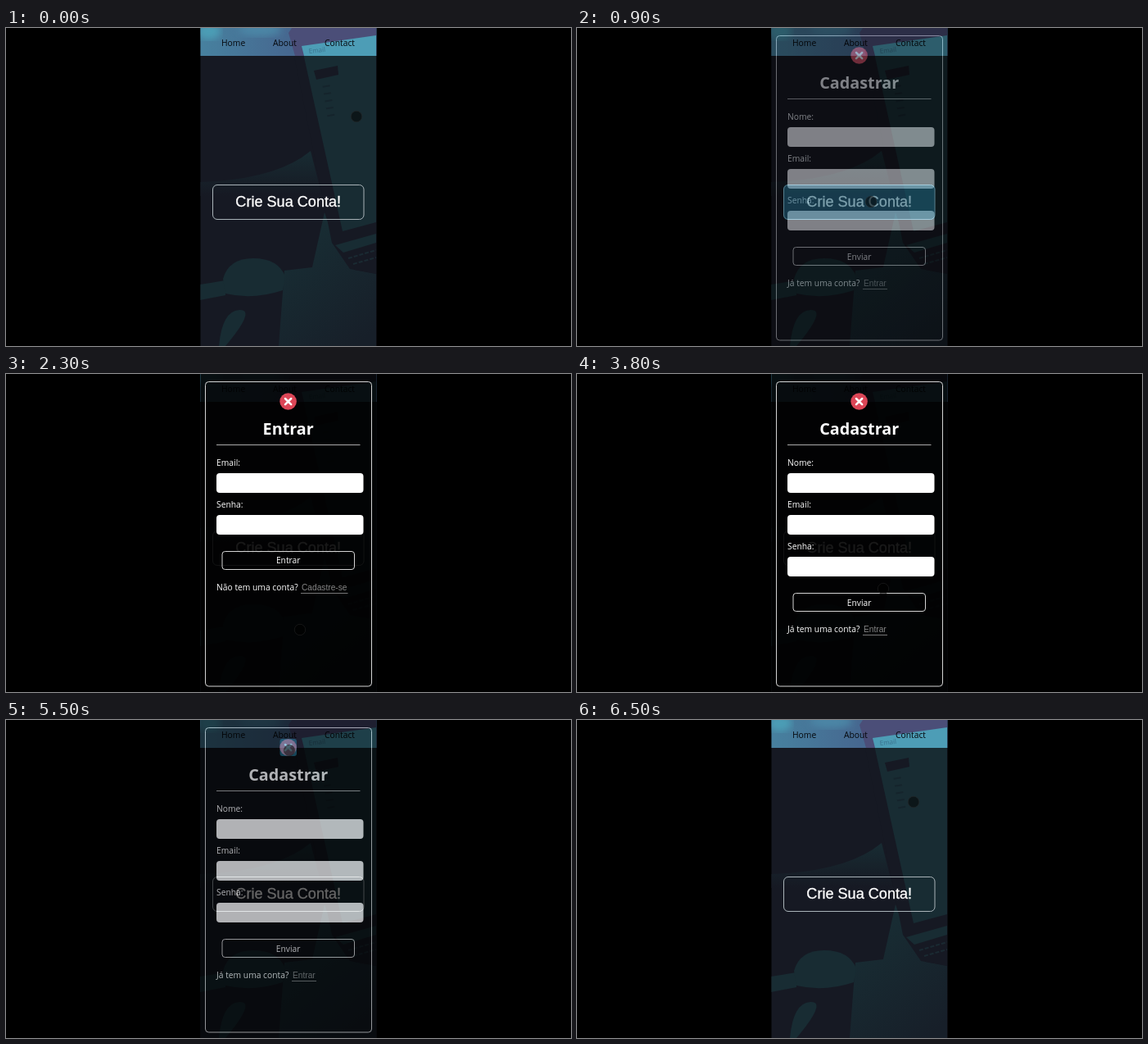
These frames come from a looping animation (690x388 px, 7100 ms). An HTML page:

```html
<!DOCTYPE html>
<html lang="pt">
<head>
<meta charset="utf-8">
<title>Crie Sua Conta</title>
<style>
html, body { margin: 0; width: 100%; height: 100%; overflow: hidden; background: #000; }
svg { display: block; width: 690px; height: 388px; }
text { font: 10.3px "Open Sans", "Noto Sans", sans-serif; fill: #fff; }
.mid { text-anchor: middle; }
.nav text { fill: #05080c; }
.title { font-size: 19.8px; font-weight: 700; }
.cta { font: 18.1px "Liberation Sans", Arial, sans-serif; stroke: #fff; stroke-width: .3px; }
.link { font: 10.2px "Liberation Sans", Arial, sans-serif; fill: #858585; }
.line { fill: none; stroke: #d4d4d4; }
.button { fill: none; stroke: #a9b3b8; }
.dark { fill: #161923; }
.teal { fill: #182c33; }
.tap { fill: #33b5e5; }
</style>
</head>
<body>
<svg viewBox="0 0 690 388">
  <defs>
    <clipPath id="phone"><rect x="237.5" width="215" height="388"/></clipPath>
    <linearGradient id="sky">
      <stop stop-color="#47819f"/><stop offset=".5" stop-color="#466890"/>
    </linearGradient>
    <linearGradient id="desk" x1=".3" y1=".2" x2=".8" y2="1">
      <stop stop-color="#182c33"/><stop offset="1" stop-color="#171f29"/>
    </linearGradient>
    <linearGradient id="sleeve" x2="0" y2="1">
      <stop stop-color="#182c33"/><stop offset="1" stop-color="#161923"/>
    </linearGradient>
    <filter id="soft"><feGaussianBlur stdDeviation="4"/></filter>
  </defs>
  <g clip-path="url(#phone)">
    <rect class="dark" x="237" width="216" height="388"/>
    <!-- sleeve, desk and cup -->
    <path d="M237 188Q330 185 372 150L386 205H237Z" fill="url(#sleeve)"/>
    <path class="teal" d="M237 313L268 308V326L237 332Z"/>
    <path d="M389 225L404 268L425 295L452 300V388H333L340 296L374 292Z" fill="url(#desk)"/>
    <path class="teal" d="M265 306Q272 281 302 281T341 303L338 320Q302 332 268 324Z"/>
    <path class="teal" d="M260 388Q264 345 285 344T268 388Z"/>
    <!-- laptop -->
    <path class="dark" d="M345 0H452V300L420 294L398 262Z"/>
    <path class="teal" d="M361 22L452 9V237L411 248Z"/>
    <path class="teal" d="M402 265L452 251V262L412 274Z"/>
    <path d="M418 281L452 271M424 288L452 280" stroke="#1a2a32" stroke-width="2" stroke-dasharray="5 2"/>
    <path class="dark" d="M376 52L405 46L406 57L379 63Z"/>
    <path d="M391 70L397 108" stroke="#15242c" stroke-width="9" stroke-dasharray="2 7"/>
    <g class="nav">
      <rect x="237" width="216" height="34" fill="url(#sky)"/>
      <ellipse cx="248" cy="4" rx="14" ry="10" fill="#4c9db5" filter="url(#soft)"/>
      <ellipse cx="310" cy="2" rx="26" ry="8" fill="#4b86a6" filter="url(#soft)"/>
      <path d="M349 0H452V34H353L345 6Z" fill="#4b4e78"/>
      <path d="M361 22L452 9V34H364Z" fill="#4d9db6"/>
      <text x="370" y="31" style="font-size:8px;fill:#39718c" transform="rotate(-6 370 31)">Email</text>
      <text x="263" y="22">Home</text>
      <text x="326" y="22">About</text>
      <text x="389" y="22">Contact</text>
    </g>
    <rect class="button" x="252.5" y="191.5" width="184.5" height="42" rx="5.5"/>
    <text class="cta mid" x="344.7" y="218">Crie Sua Conta!</text>

    <g id="modal">
      <rect x="237" width="216" height="388" opacity=".9"/>
      <rect class="line" x="243.5" y="9.5" width="203" height="371.5" rx="4"/>
      <circle cx="344.6" cy="33.5" r="10.3" fill="#dc4657"/>
      <path d="M341 30l7.2 7.2m0-7.2l-7.2 7.2" stroke="#fff" stroke-width="2.5" stroke-linecap="round"/>
      <path d="M257 86.5H432.5" stroke="#aaa"/>
      <g id="signup"></g>
      <g id="login"></g>
    </g>
    <rect id="tapCta" class="tap" x="252" y="191" width="185.5" height="43" rx="5.5"/>
    <rect id="tapClose" class="tap" x="334.5" y="23" width="20.5" height="21" rx="3"/>
    <circle id="touch" r="6.7" fill-opacity=".5" stroke="#282828" stroke-opacity=".5"/>
  </g>
</svg>
<script>
const $ = id => document.getElementById(id);
const set = (id, name, value) => $(id).setAttribute(name, value);

function form(id, title, labels, action, question, link, x1, x2) {
  const top = 121, step = 51.2, end = top + labels.length * step;
  const fields = labels.map((label, i) => {
    const y = Math.round(top + i * step);
    return `<text x="257" y="${y - 9}">${label}:</text>
      <rect x="257" y="${y}" width="179.5" height="24" rx="4" fill="#fff"/>`;
  }).join('');
  $(id).innerHTML = `<text class="title mid" x="344.7" y="74">${title}</text>${fields}
    <rect class="line" x="264" y="${Math.floor(end - 7) + .5}" width="161.5" height="22" rx="3.5"/>
    <text class="mid" x="344.7" y="${end + 8}">${action}</text>
    <text x="257" y="${end + 40.5}">${question}</text>
    <text class="link" x="${x1 + 1}" y="${end + 40.5}">${link}</text>
    <path d="M${x1} ${Math.floor(end + 44) + .5}H${x2}" stroke="#777"/>`;
}
form('signup', 'Cadastrar', ['Nome', 'Email', 'Senha'], 'Enviar', 'Já tem uma conta?', 'Entrar', 349, 379);
form('login', 'Entrar', ['Email', 'Senha'], 'Entrar', 'Não tem uma conta?', 'Cadastre-se', 360, 417.5);

const ramp = (t, from, to) => Math.min(1, Math.max(0, (t - from) / (to - from)));

// Each move: start, end, x, y, sideways bow
const moves = [
  [0, 600, 359, 212, 0],
  [1300, 1900, 359, 312, -7],
  [2700, 3000, 374, 262, 0],
  [4000, 4800, 347, 46, -15],
  [4800, 5200, 346, 37, 0],
  [5800, 6200, 385, 93, 0],
  [6300, 6500, 411, 100, 0]
];

function touchAt(t) {
  return moves.reduce(([x, y], [from, to, x2, y2, bow]) => {
    const p = ramp(t, from, to);
    return [x + (x2 - x) * p + bow * Math.sin(Math.PI * p), y + (y2 - y) * p];
  }, [428, 108]);
}

const start = performance.now();
function draw(now) {
  const t = Math.floor(Math.max(0, now - start) % 7100 / 100) * 100;
  const [x, y] = touchAt(t);
  const login = t >= 2300 && t < 3800;
  set('touch', 'cx', x);
  set('touch', 'cy', y);
  set('modal', 'opacity', ramp(t, 700, 1100) ** 1.15 - ramp(t, 5400, 5700));
  set('tapCta', 'opacity', t < 800 ? 0 : .4 * (1 - ramp(t, 800, 1100)));
  set('tapClose', 'opacity', t >= 5500 && t < 5700 ? .35 : 0);
  $('login').style.display = login ? '' : 'none';
  $('signup').style.display = login ? 'none' : '';
  requestAnimationFrame(draw);
}
draw(start);
</script>
</body>
</html>
```
